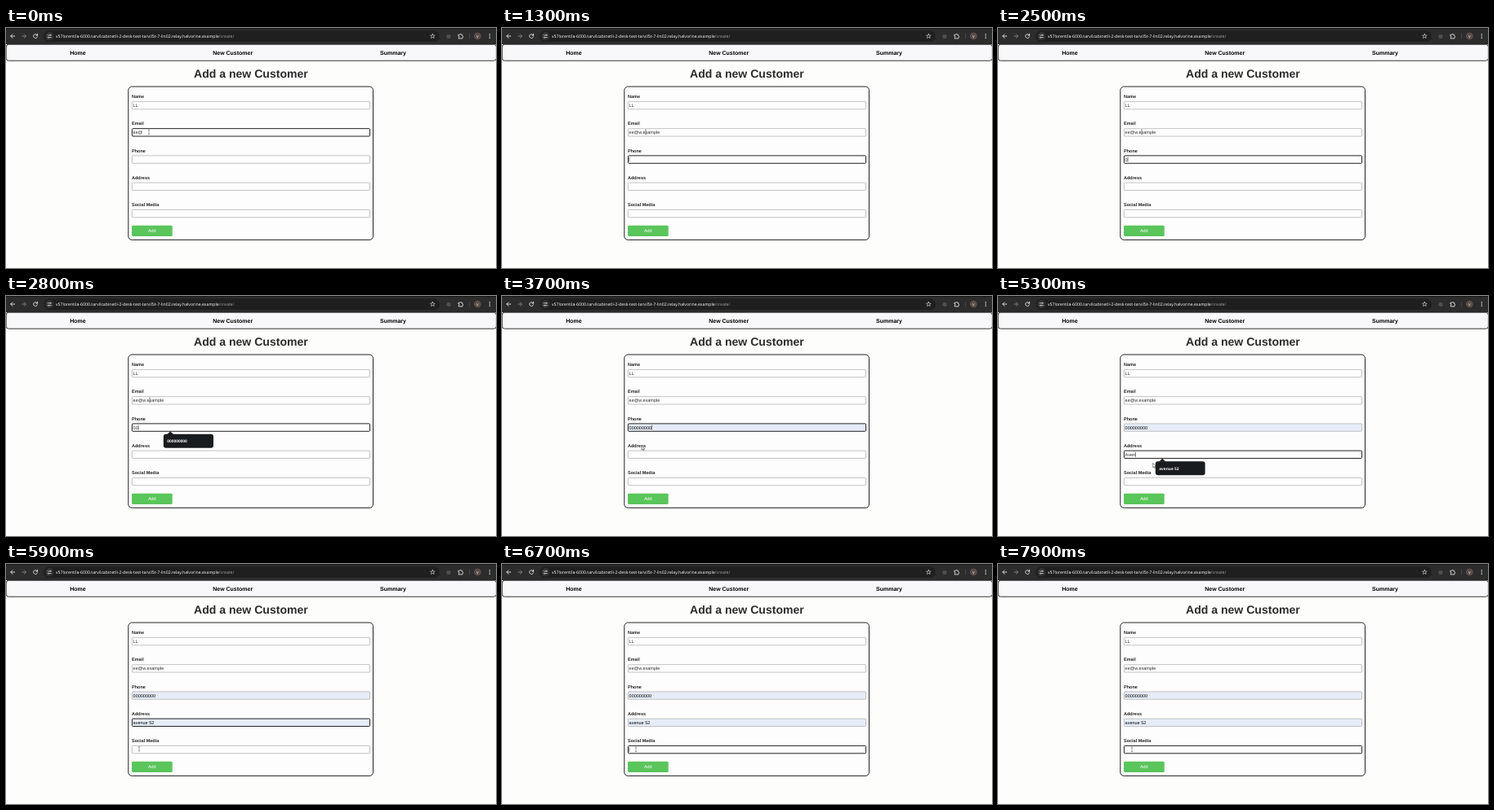
Write an HTML page that moves like this. It is 600 px wide and 295 px high and loops after 8 s.

```html
<!DOCTYPE html>
<html lang="en">
<head>
<meta charset="utf-8">
<title>Add a new Customer</title>
<style>
  html, body { margin: 0; width: 100%; height: 100%; overflow: hidden; background: #fdfdfc; }
  svg { display: block; width: 600px; height: 295px; text-rendering: geometricPrecision; }
  text { font: 5.5px "Liberation Sans", Arial, sans-serif; fill: #2c2c2c; white-space: pre; }
  .url { font: 5.2px "Open Sans", "Noto Sans", sans-serif; fill: #fff; }
  .url .path { fill: #a0a0a0; }
  .nav text { font-size: 7px; font-weight: 700; fill: #000; text-anchor: middle; }
  .title { font-size: 14.06px; font-weight: 700; text-anchor: middle; }
  .label { font-weight: 700; fill: #222; }
  .icon { fill: none; stroke: #e4e4e4; stroke-width: .9; stroke-linecap: round; stroke-linejoin: round; }
  .field { fill: #fefefe; stroke: #9a9a9a; stroke-width: .6; }
  .field.filled { fill: #e6edf8; }
  .field.filled + text { fill: #000; }
  .field.focus { stroke: #222; stroke-width: 1; }
  .popup text { font: 700 4.8px "Open Sans", "Noto Sans", sans-serif; fill: #f4f4f4; }
  .popup .manage { font-weight: 400; fill: #b4b7ba; }
</style>
</head>
<body>
<svg id="stage" viewBox="0 0 600 295">
  <rect width="600" height="295" fill="#fdfdfc"/>

  <g>
    <rect width="600" height="20" fill="#2c2c2c"/>
    <rect width="600" height="1" fill="#161616"/>
    <rect x="46" y="3.2" width="485" height="13.8" rx="6.9" fill="#1f1f1f"/>
    <circle cx="53.2" cy="10.1" r="5" fill="#323232"/>
    <g class="icon">
      <path d="M10.6 10H5.8M8 7.7 5.7 10 8 12.3"/>
      <path d="M19.6 10h4.8M22.2 7.7 24.5 10l-2.3 2.3" stroke="#858585"/>
      <path d="M38.4 8.9a2.5 2.5 0 1 0 .1 2M38.6 7.2v1.9h-1.9"/>
      <path d="M51 8.8h2M54.8 8.8h.6M51 11.6h.6M53.4 11.6h2" stroke-width=".7"/>
      <circle cx="54" cy="8.8" r=".7" stroke-width=".5"/>
      <circle cx="52.4" cy="11.6" r=".7" stroke-width=".5"/>
      <path d="m522.4 7.2.8 1.9 2 .1-1.6 1.3.6 2-1.8-1.1-1.8 1.1.6-2-1.6-1.3 2-.1z" stroke-width=".6"/>
      <path d="M554.3 8.3h1.5a.9.9 0 0 1 1.8 0h1.2v1.6a.9.9 0 0 1 0 1.8v1.2h-4.5v-1.5a.8.8 0 0 0 0-1.6z"/>
    </g>
    <circle cx="542" cy="10.3" r="2.6" fill="#505050"/>
    <path d="M567.5 6.5v7" stroke="#555" stroke-width=".6"/>
    <circle cx="577.4" cy="10" r="4.4" fill="#5d4d47"/>
    <text x="577.4" y="11.7" text-anchor="middle" style="font-size:4.6px;fill:#eee">V</text>
    <g fill="#e4e4e4"><circle cx="592.3" cy="7.8" r=".7"/><circle cx="592.3" cy="10" r=".7"/><circle cx="592.3" cy="12.2" r=".7"/></g>
    <text class="url" x="61" y="12">v57lorentila-6000.tarvilcabinetli-2-desk-test-tarvil5t-7-lin02.relay.halvorine.example<tspan class="path">/create/</tspan></text>
  </g>

  <g class="nav">
    <rect x=".2" y="20.2" width="600.2" height="20" rx="3" fill="#f8f8fa" stroke="#222" stroke-width=".9"/>
    <text x="88" y="32.5">Home</text>
    <text x="277.7" y="32.5">New Customer</text>
    <text x="474" y="32.5">Summary</text>
  </g>

  <text class="title" x="299.9" y="61.3">Add a new Customer</text>
  <rect x="149.8" y="72" width="299.7" height="188.4" rx="4.5" fill="#fdfdfd" stroke="#222"/>
  <g id="form"></g>
  <path id="caret" stroke="#222" stroke-width=".6"/>
  <rect x="154" y="242.8" width="49.7" height="13.2" rx="1.5" fill="#59c55b"/>
  <text x="178.8" y="251.3" text-anchor="middle" style="fill:#fff">Add</text>

  <g id="mouse">
    <path id="beam" d="M-1.1-2.7H1.1M0-2.7V2.7M-1.1 2.7H1.1" fill="none" stroke="#444" stroke-width=".5"/>
    <path id="arrow" d="M0 0V5.4L1.3 4.2 2.2 6.2 3 5.8 2.2 3.9H3.9Z" fill="#fff" stroke="#222" stroke-width=".5"/>
  </g>
  <g id="popups"></g>
</svg>

<script>
const LOOP = 8000, BLINK = 260, PITCH = 33.25;
const $ = id => document.getElementById(id);

function add(parent, tag, attrs, text) {
  const el = document.createElementNS("http://www.w3.org/2000/svg", tag);
  for (const key in attrs) el.setAttribute(key, attrs[key]);
  if (text) el.textContent = text;
  return parent.appendChild(el);
}

const fields = ["Name", "Email", "Phone", "Address", "Social Media"].map((name, i) => {
  const y = 90.4 + i * PITCH;
  add($("form"), "text", { class: "label", x: 154, y: y - 4.4 }, name);
  return {
    y,
    box: add($("form"), "rect", { x: 154.4, y, width: 291.2, height: 9.4, rx: 1 }),
    text: add($("form"), "text", { x: 155.6, y: y + 6.6 })
  };
});

function makePopup(top, width, rows, manage) {
  const g = add($("popups"), "g", { class: "popup" });
  const height = manage ? 49 : 17;
  add(g, "path", { d: `M197 ${top + .5}l4.2-3.9 4.2 3.9z`, fill: "#191c1f" });
  add(g, "rect", { x: 192.8, y: top, width, height, rx: 3, fill: "#191c1f" });
  rows.forEach((row, i) => add(g, "text", { x: 197.2, y: top + 10.4 + i * 14 }, row));
  if (manage) {
    add(g, "path", { d: `M193 ${top + 31.5}h${width - .4}`, stroke: "#3a3d40", "stroke-width": .5 });
    add(g, "circle", { cx: 201.2, cy: top + 40.2, r: 2.6, fill: "#c9cbcd" });
    add(g, "text", { class: "manage", x: 209.8, y: top + 42 }, "Manage addresses...");
  }
  return g;
}

const popups = {
  phone: makePopup(169.8, 61.2, ["000000000"]),
  list: makePopup(203.2, 67.8, ["Travessa de Morvelo, 27", "52 Dunmorvane Lane"], true),
  street: makePopup(203.2, 60.8, ["avenue 52"])
};

// [time, field, value, autofilled]
const email = "ee@w.example";
const edits = [
  [-300, 0, "LL"],
  [-300, 1, email.slice(0, 3)],
  ...[...email.slice(3)].map((_, i) => [100 + i * 100, 1, email.slice(0, 4 + i)]),
  [1110, 2, ""], [2400, 2, "0"], [2650, 2, "00"], [3050, 2, "000000000", true],
  [3850, 3, ""], [4600, 3, "A"], [4800, 3, "Av"], [5000, 3, "Ave"], [5200, 3, "Aven"],
  [5500, 3, "avenue 52", true],
  [5990, 4, ""]
];

const popupTimes = { phone: [2700, 3050], list: [3950, 4600], street: [4600, 5500] };

// [time, x, y]
const path = [
  [0, 175, 128], [900, 176, 128], [3400, 176, 128], [3800, 170, 194], [4300, 170, 194],
  [4800, 189.7, 205.4], [5520, 189.7, 205.4], [5850, 163, 227.3], [6400, 164, 227.8], [LOOP, 164, 227.8]
];

function mouseAt(t) {
  const i = path.findIndex(p => p[0] > t);
  const [t0, x0, y0] = path[i - 1], [t1, x1, y1] = path[i];
  const u = (t - t0) / (t1 - t0), k = u * u * (3 - 2 * u);
  return [x0 + (x1 - x0) * k, y0 + (y1 - y0) * k];
}

function draw(t) {
  const values = fields.map(() => ["", false]);
  let last;
  for (const edit of edits) {
    if (edit[0] > t) break;
    last = edit;
    values[edit[1]] = [edit[2], edit[3]];
  }
  const [since, focus] = last;
  fields.forEach((f, i) => {
    const [value, filled] = values[i];
    f.text.textContent = value;
    f.box.setAttribute("class", "field" + (filled ? " filled" : "") + (i === focus ? " focus" : ""));
  });

  const f = fields[focus];
  const x = 155.9 + (values[focus][0] ? f.text.getComputedTextLength() : 0);
  $("caret").setAttribute("d", `M${x} ${f.y + 1.7}v6`);
  $("caret").style.display = Math.floor((t - since) / BLINK) % 2 ? "none" : "";

  for (const name in popups) {
    const [from, to] = popupTimes[name];
    popups[name].style.display = t >= from && t < to ? "" : "none";
  }

  const [mx, my] = mouseAt(t);
  const overField = fields.some(f => my >= f.y && my <= f.y + 9.4);
  $("mouse").setAttribute("transform", `translate(${mx} ${my})`);
  $("beam").style.display = overField ? "" : "none";
  $("arrow").style.display = overField ? "none" : "";
}

const start = performance.now();
function tick() {
  draw((performance.now() - start) % LOOP);
  requestAnimationFrame(tick);
}
tick();
</script>
</body>
</html>
```
